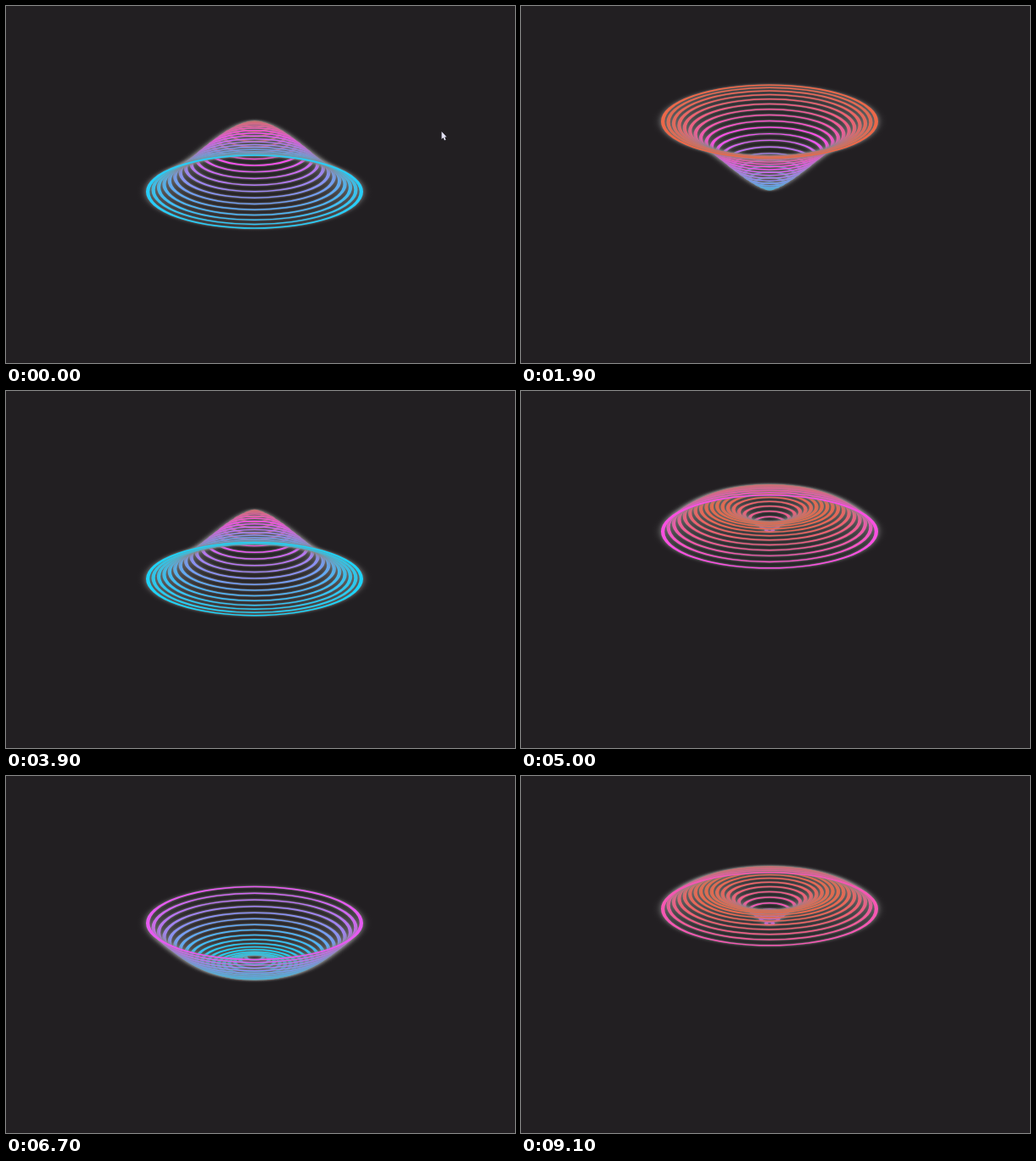
An HTML page with a canvas that plays this animation: 600 px wide and 421 px high, repeating every 9.2 s.

```html
<!DOCTYPE html>
<html lang="en">
<head>
<meta charset="utf-8">
<title>Wave rings</title>
<style>
html, body { margin: 0; width: 100%; height: 100%; overflow: hidden; background: #221f22; }
canvas { display: block; }
</style>
</head>
<body>
<canvas id="stage" width="600" height="421"></canvas>
<script>
const ctx = document.getElementById('stage').getContext('2d');

const LOOP = 9200, STEP = 100;
const PERIOD = 3955, LOWEST_AT = -140;
const COUNT = 20, LEAD = 82;
const CX = 293, LOW = 222, RISE = 86, TILT = 0.342;
const GAP = 6.4, WIDTH = 4.3, BLUR = 4, REACH = 12;
const CYAN = [28, 212, 248], PINK = [250, 78, 240], ORANGE = [236, 104, 72];
const PINK_AT = 0.62;

const clamp = x => Math.min(1, Math.max(0, x));
const swing = turn => (1 - Math.cos(2 * Math.PI * turn)) / 2;

function mix(a, b, k) {
  return `rgb(${a.map((v, i) => Math.round(v + (b[i] - v) * k)).join(',')})`;
}

// Colour follows height: cyan at the bottom, orange at the top
function ringColor(height) {
  return height < PINK_AT
    ? mix(CYAN, PINK, height / PINK_AT)
    : mix(PINK, ORANGE, (height - PINK_AT) / (1 - PINK_AT));
}

// Soft grey halo on both sides of the ring's border
function makeGlow(radius) {
  const lo = Math.max(0, radius - WIDTH / 2 - REACH);
  const hi = radius + WIDTH / 2 + REACH;
  const fill = ctx.createRadialGradient(0, 0, lo, 0, 0, hi);
  const steps = 28;
  for (let i = 0; i <= steps; i++) {
    const r = lo + (hi - lo) * i / steps;
    const d = Math.max(0, Math.abs(r - radius) - WIDTH / 2);
    const alpha = Math.max(0, 1 / (1 + Math.exp(1.7 * d / BLUR)) - 0.006);
    fill.addColorStop(i / steps, `rgba(134,134,134,${alpha.toFixed(3)})`);
  }
  return { lo, hi, fill };
}

const rings = Array.from({ length: COUNT }, (_, i) => {
  const radius = GAP * (i + 1) - WIDTH / 2;
  return { radius, lead: (COUNT - 1 - i) * LEAD, glow: makeGlow(radius) };
});

function drawRing(ring, time) {
  const height = swing((time + ring.lead - LOWEST_AT) / PERIOD);
  const { radius, glow } = ring;

  ctx.save();
  ctx.translate(CX, LOW - RISE * height);
  ctx.scale(1, TILT);
  ctx.beginPath();
  ctx.arc(0, 0, glow.hi, 0, 2 * Math.PI);
  if (glow.lo > 0) {
    ctx.moveTo(glow.lo, 0);
    ctx.arc(0, 0, glow.lo, 0, 2 * Math.PI);
  }
  ctx.fillStyle = glow.fill;
  ctx.fill('evenodd');

  ctx.beginPath();
  ctx.arc(0, 0, radius, 0, 2 * Math.PI);
  ctx.lineWidth = WIDTH;
  ctx.strokeStyle = ringColor(height);
  ctx.stroke();
  ctx.restore();
}

const arrow = new Path2D('M0 0V9L2 7.2L3.4 10.4L5 9.7L3.6 6.6H6Z');

function drawPointer(t) {
  if (t >= 1400) return;
  const k = swing(clamp((t - 100) / 800) / 2);
  ctx.save();
  ctx.translate(513.5 - 350 * k, 148 - 99 * k);
  ctx.lineWidth = 1;
  ctx.strokeStyle = '#141216';
  ctx.stroke(arrow);
  ctx.fillStyle = '#e4e2f4';
  ctx.fill(arrow);
  ctx.restore();
}

function draw(t) {
  ctx.fillStyle = '#221f22';
  ctx.fillRect(0, 0, 600, 421);
  // The wave starts slightly ahead and settles within the first second
  const time = t + 95 * clamp(1 - t / 1000);
  for (const ring of rings) drawRing(ring, time);
  drawPointer(t);
}

function tick() {
  draw(Math.floor(performance.now() % LOOP / STEP) * STEP);
  requestAnimationFrame(tick);
}
tick();
</script>
</body>
</html>
```
